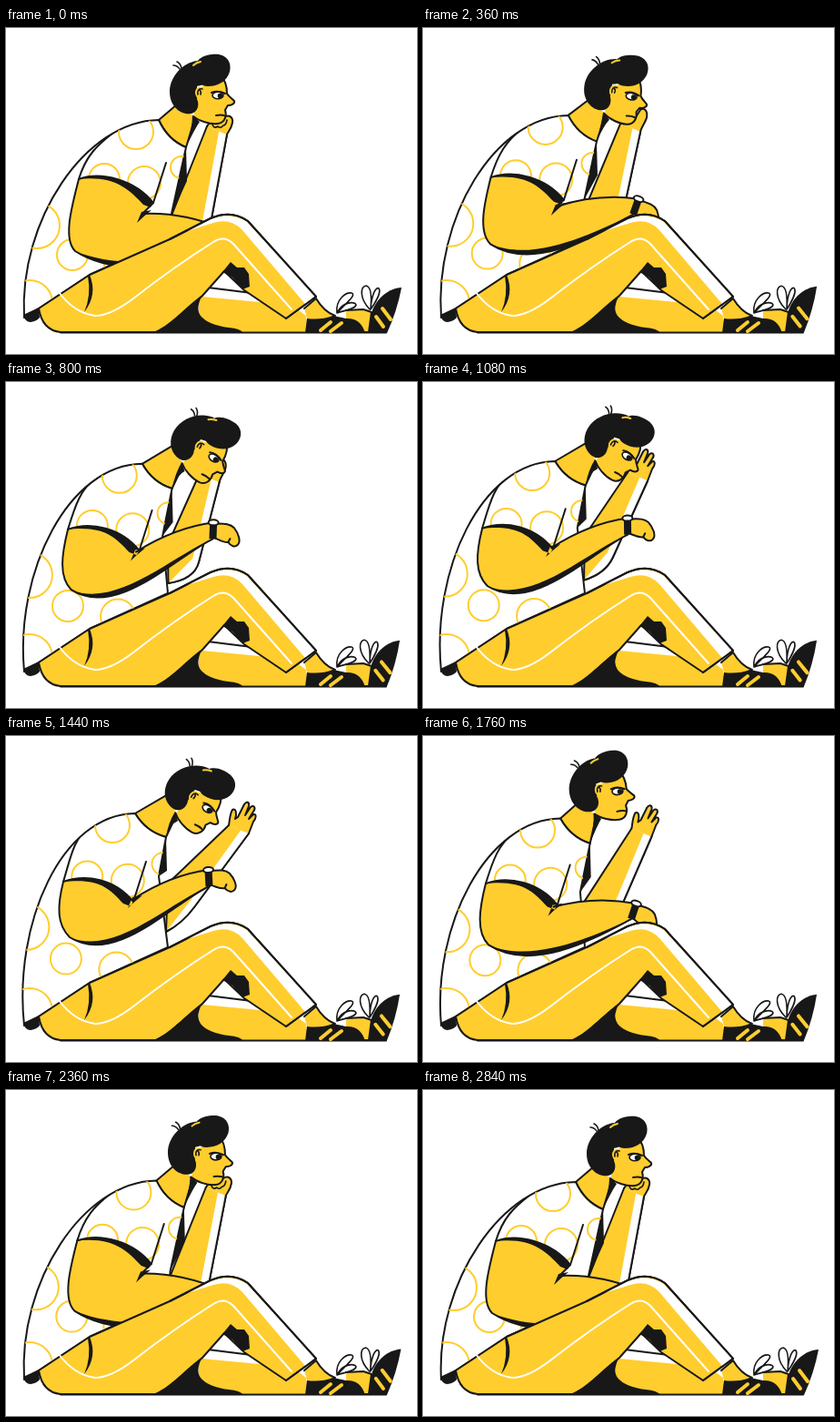
Recreate the animation shown at these times as an HTML page. Size 452 by 358 pixels, loop 2880 ms.

```html
<!DOCTYPE html>
<html lang="en">
<head>
<meta charset="utf-8">
<title>Sitting and thinking</title>
<style>
  html, body { margin: 0; width: 100%; height: 100%; overflow: hidden; background: #fff; }
  svg { display: block; width: 100vw; height: 100vh; }
  path { stroke-linejoin: round; stroke-linecap: round; }
  .line { fill: none; stroke: #181818; stroke-width: 2; }
  .skin { fill: #ffcd2e; stroke: #181818; stroke-width: 2; }
  .flat { fill: #ffcd2e; }
  .ink { fill: #181818; }
  .white { fill: #fff; }
  .cloth { fill: #fff; stroke: #181818; stroke-width: 2; }
  .trim { fill: none; stroke: #ffcd2e; stroke-width: 2; }
  .stripe { fill: none; stroke: #ffcd2e; stroke-width: 4; }
  .thin { fill: none; stroke: #181818; stroke-width: 1.6; }
</style>
</head>
<body>
<svg viewBox="0 0 452 358">
  <clipPath id="shirtClip"><path id="shirtMask"/></clipPath>

  <path id="farArm" class="skin"/>
  <path id="farTrim" class="white"/>
  <path id="farEdge" class="line"/>
  <g id="farHand">
    <g><path class="skin" d="M-11 -4C-8 -10 -4 -8 0 -9L8 -14C14 -18 18 -13 17 -8C16 -1 12 2 11 5"/>
      <path class="thin" d="M-5 -6Q-3 -1 1 -4Q4 -1 7 -5Q10 -5 11 -11"/></g>
    <path class="skin" d="M-11 -4C-8 -9 -2 -7 4 -8L11 -19C15 -22 19 -18 18 -11C17 -6 12 0 11 5"/>
    <path class="skin" d="M-11 -4C-10 -9 -10 -16 -7 -21C-3 -23 -2 -17 -4 -11L-1 -13L6 -27C9 -31 12 -29 11 -25L7 -15L13 -24C17 -27 19 -23 16 -19L11 -11L16 -16C20 -17 19 -11 16 -8L11 5"/>
  </g>

  <path id="neck" class="skin"/>
  <path id="neckShade" class="ink"/>
  <g id="head">
    <path class="flat" d="M22 -18L28 0L24 28L-7 26L-8 0Z"/>
    <path class="skin" d="M22 -18C28 -12 29 -4 29 2C31 5 35 8 37 10C38 13 34 15 30 15L27 20C29 26 27 34 19 35C10 36 -2 32 -8 27"/>
    <path class="ink" d="M-4 -34C-20 -32 -34 -16 -34 0C-34 16 -22 26 -10 24C-3 22 -1 14 -4 8L-4 -6L4 -8L8 -20Z"/>
    <ellipse class="flat" cx="-1" cy="1" rx="5" ry="6.5"/>
    <path class="thin" d="M-3 3C-4 -2 -1 -4 2 -3M-1 -2Q1 0 0 3"/>
    <path class="ink" d="M-6 -22C-8 -38 8 -42 20 -41C31 -39 34 -30 32 -22C29 -12 20 -6 8 -6C0 -6 -4 -12 -6 -22"/>
    <path class="trim" d="M-8 -29Q-5 -32 0 -33"/>
    <path class="thin" d="M-23 -25Q-26 -29 -30 -29M-21 -26Q-22 -31 -26 -33"/>
    <ellipse class="cloth" cx="19" cy="4" rx="6" ry="3.8" style="stroke-width:1.6"/>
    <circle class="ink" cx="21.5" cy="4.5" r="2.8"/>
    <path class="line" d="M12 1Q19 -2 27 2"/>
    <path class="line" d="M17 26Q22 25 26 26"/>
  </g>

  <path id="shirt" class="cloth"/>
  <g clip-path="url(#shirtClip)">
    <g id="dots" class="trim"></g>
    <path id="seams" class="line"/>
  </g>
  <path id="chest" class="ink"/>

  <g id="nearHand">
    <path class="skin" d="M2 -8C10 -8 18 -9 23 -4C28 2 31 10 28 14C25 18 20 16 17 12C13 13 8 10 2 8"/>
    <path class="line" d="M17 12L19 8"/>
  </g>
  <path id="nearArm" class="skin"/>
  <path id="armShade" class="ink"/>
  <g id="watch">
    <path class="ink" d="M-4 -9H4V9H-4Z"/>
    <ellipse class="cloth" cy="-9" rx="5.5" ry="3"/>
  </g>

  <g id="foot">
    <path class="ink" d="M435 285C420 286 408 297 403 310L400 320L398 335H419Q430 311 435 285Z"/>
    <path class="stripe" d="M414 308L423 320M407 317L415 328"/>
    <path class="thin" d="M400 309C388 296 390 284 396 283C402 284 402 298 401 309C402 292 407 284 410 286C413 290 406 302 401 309"/>
  </g>
  <path class="skin" d="M374 310L393 309L402 312L399 334H374"/>

  <path class="flat" d="M212 297L222 286L310 301L330 316L332 334H212Z"/>
  <path class="white" d="M222 285L300 297L310 304L216 295Z"/>
  <path class="line" d="M222 285L270 291L300 299"/>
  <path class="skin" d="M36 308L92 271L180 232L225 209Q248 199 266 212L341 295L308 319L262 288L240 267L216 294L170 334H60Q40 332 36 308Z"/>
  <path class="white" d="M196 224L225 210Q247 201 265 213L340 294L329 303L260 222Q247 208 228 214Z"/>
  <path class="line" d="M180 232L225 209Q248 199 266 212L341 295L308 319"/>
  <path class="ink" d="M238 268L247 257L254 263L262 263L267 270L268 284L260 287L249 274Z"/>
  <path class="ink" d="M160 335C182 326 194 309 216 293Q208 308 214 316Q222 326 245 329Q258 330 261 335Z"/>
  <path class="ink" d="M92 271Q101 293 86 312Q94 294 90 272Z"/>
  <path d="M58 290Q75 313 98 316Q115 316 140 297Q185 262 228 235Q240 227 250 237L314 309" fill="none" stroke="#fff" stroke-width="2"/>
  <path class="ink" d="M19 315Q21 323 27 323Q34 322 37 318L36 307Z"/>
  <path class="line" d="M60 334.5H418"/>

  <path class="skin" d="M328 308L341 297Q350 312 362 316L345 324L332 322"/>
  <path class="ink" d="M329 335L331 319Q346 321 360 316L374 319Q390 318 395 335Z"/>
  <path class="stripe" d="M346 332L357 323M357 333L369 324"/>
  <path class="thin" d="M364 313C362 298 374 290 380 291C386 293 374 302 364 313C370 300 384 300 385 304C384 309 372 310 364 313"/>
</svg>

<script>
const LOOP = 2880;
const keys = {
  time: [0, 360, 800, 1440, 1760, 1960, 2360, 2800],
  lean: [0, .32, .7, 1, .65, .5, .1, 0],      // upper body sinking back
  nod:  [0, 9, 31, 33, -4, -7, 1, 0],         // head turn in degrees
  lift: [0, .45, .9, 1, .5, .3, 0, 0],        // near hand leaving the knee
  away: [0, 0, 0, 1, .45, .25, 0, 0]          // far hand leaving the face
};
const dots = [
  [143, 114, 19], [108, 166, 17], [152, 170, 18], [193, 153, 12],
  [34, 217, 25], [73, 249, 17], [127, 260, 19], [26, 302, 25]
];

const $ = id => document.getElementById(id);
const draw = (id, d) => $(id).setAttribute('d', d);
const place = (id, [x, y], turn = 0) =>
  $(id).setAttribute('transform', `translate(${x} ${y}) rotate(${turn})`);
const add = ([x, y], dx, dy) => [x + dx, y + dy];
const mix = (a, b, k) => a.map((v, i) => v + (b[i] - v) * k);
const spin = ([x, y], deg) => {
  const a = deg * Math.PI / 180, c = Math.cos(a), s = Math.sin(a);
  return [x * c - y * s, x * s + y * c];
};
// Path builder: path`M${p}L${q}` with points as [x, y].
const path = (text, ...points) =>
  text.reduce((d, part, i) => d + points[i - 1].map(v => v.toFixed(2)).join(' ') + ' ' + part);

for (const [x, y, r] of dots) {
  const c = document.createElementNS('http://www.w3.org/2000/svg', 'circle');
  c.setAttribute('r', r);
  $('dots').append(c);
}

// Monotone cubic through the keys: smooth, no overshoot.
function sample(values, t) {
  const T = keys.time, last = T.length - 1;
  if (t >= T[last]) return values[last];
  const i = T.findIndex((_, k) => t < T[k + 1]);
  const slope = k => (values[k + 1] - values[k]) / (T[k + 1] - T[k]);
  const tangent = k => {
    if (k === 0 || k === last) return 0;
    const a = slope(k - 1), b = slope(k);
    return a * b <= 0 ? 0 : 2 * a * b / (a + b);
  };
  const h = T[i + 1] - T[i], u = (t - T[i]) / h, v = 1 - u;
  return values[i] * v * v * (1 + 2 * u) + values[i + 1] * u * u * (3 - 2 * u)
    + h * u * v * (v * tangent(i) - u * tangent(i + 1));
}

function drawHead(nape, collar, throat, nod) {
  const ear = add(nape, 46 + .6 * nod, -31 + .37 * nod);
  const onHead = (x, y) => add(ear, ...spin([x, y], nod));
  place('head', ear, nod);
  draw('neck', path`M${onHead(-26, 14)}L${nape}Q${throat}${collar}L${onHead(-6, 28)}`);
  draw('neckShade', path`M${onHead(-9, 26)}L${onHead(-1, 33)}Q${onHead(-6, 40)}${collar}Q${onHead(-9, 40)}${onHead(-9, 26)}Z`);
}

function drawShirt(nape, collar, throat, lean) {
  const chest = [182 - 14 * lean, 204 - 50 * lean], hem = [20, 318];
  const shirt = path`M${nape}Q${throat}${collar}L${chest}L178 232L92 271L36 308L${hem}C${[14 - 6 * lean, 212 - 6 * lean]}${add(nape, -81, 1)}${nape}Z`;
  draw('shirt', shirt);
  draw('shirtMask', shirt);
  draw('chest', path`M${collar}L${add(collar, 1, 37)}L${chest}Z`);
  dots.forEach(([x, y], i) => {
    const share = lean * Math.max(0, (300 - y) / 186);
    const c = $('dots').children[i];
    c.setAttribute('cx', x - 26 * share);
    c.setAttribute('cy', y - 16 * share);
  });
}

function drawNearArm(nape, lean, lift) {
  const back = [80 - 17 * lean, 166 - 6 * lean];
  const front = [162 - 22 * lean, 192 - 10 * lean];
  const crease = [150 - 10 * lean, 204 - 25 * lean];
  const elbow = [76 - 6 * lean, 245 - 24 * lean];
  const wrist = [236 - 13 * lift * lean, 229 - 73 * lift];
  const turn = 25 - 28 * lift * lift;
  const [ox, oy] = spin([0, -9], turn);
  const top = add(wrist, ox, oy), bottom = add(wrist, -ox, -oy);
  const bulge = k => add(mix(crease, top, k), 0, -7);
  const hem = path`M${back}C${add(back, 25, -9)}${add(front, -20, -25)}${front}`;
  const under = path`C${add(wrist, -40, 28)}${add(elbow, 50, 32)}${elbow}`;

  draw('nearArm', hem + path`L${crease}C${bulge(1 / 3)}${bulge(2 / 3)}${top}L${bottom}` + under
    + path`C${add(elbow, -14, -14)}${add(back, -7, 28)}${back}Z`);
  draw('armShade', hem + path`L${add(front, -3, 5)}L${add(front, -11, 2)}C${add(front, -27, -15)}${add(back, 40, -4)}${back}Z`
    + path`M${add(crease, 10, -4)}L${add(crease, -1, -2)}L${add(crease, -6, 10)}Q${add(crease, 1, 3)}${add(crease, 10, -4)}Z`
    + path`M${bottom}` + under + path`C${add(elbow, 50, 21)}${add(wrist, -44, 27)}${bottom}Z`);
  draw('seams', path`M${back}C${add(back, 8, -26)}${add(nape, -68, 28)}${add(nape, -50, 14)}M${add(front, 14, -44)}L${front}`);
  place('watch', wrist, turn);
  place('nearHand', wrist, turn);
}

function drawFarArm(lean, away, hand) {
  const wrist = [232 - 12 * lean + 36 * away, 112 - 10 * lean];
  const left = add(wrist, -11, -4), right = add(wrist, 11, 5);
  const inner = [178, 216 - 54 * lean];
  const outer = [224 - 17 * lean, 220 - 32 * lean];
  const base = [184 - 8 * lean, 235 - 20 * lean];
  const edge = path`M${base}Q${mix(right, outer, 1.22)}${outer}L${right}`;
  draw('farArm', path`M${left}L${inner}L` + edge.slice(1));
  draw('farTrim', edge + path`L${mix(right, left, .4)}L${mix(outer, inner, .2)}Z`);
  draw('farEdge', edge);
  place('farHand', wrist);
  [...$('farHand').children].forEach((g, i) =>
    g.setAttribute('visibility', i === hand ? 'visible' : 'hidden'));
}

function render(now) {
  const t = Math.floor(now % LOOP / 40) * 40;
  const lean = sample(keys.lean, t), nod = sample(keys.nod, t);
  const lift = sample(keys.lift, t), away = sample(keys.away, t);
  const nape = [168 - 26 * lean, 101 - 16 * lean];
  const collar = [198 - 22 * lean, 131 - 20 * lean];
  const throat = add(mix(nape, collar, .5), -5, 7);
  const [fist, cheek, open] = [0, 1, 2];
  const hand = t < 180 || t >= 2100 ? fist : t < 1040 ? cheek : open;

  drawHead(nape, collar, throat, nod);
  drawShirt(nape, collar, throat, lean);
  drawNearArm(nape, lean, lift);
  drawFarArm(lean, away, hand);
  $('foot').setAttribute('transform', `rotate(${-2.2 * Math.min(1, lean * 3)} 400 335)`);
}

const start = performance.now();
function tick() {
  render(performance.now() - start);
  requestAnimationFrame(tick);
}
tick();
</script>
</body>
</html>
```
